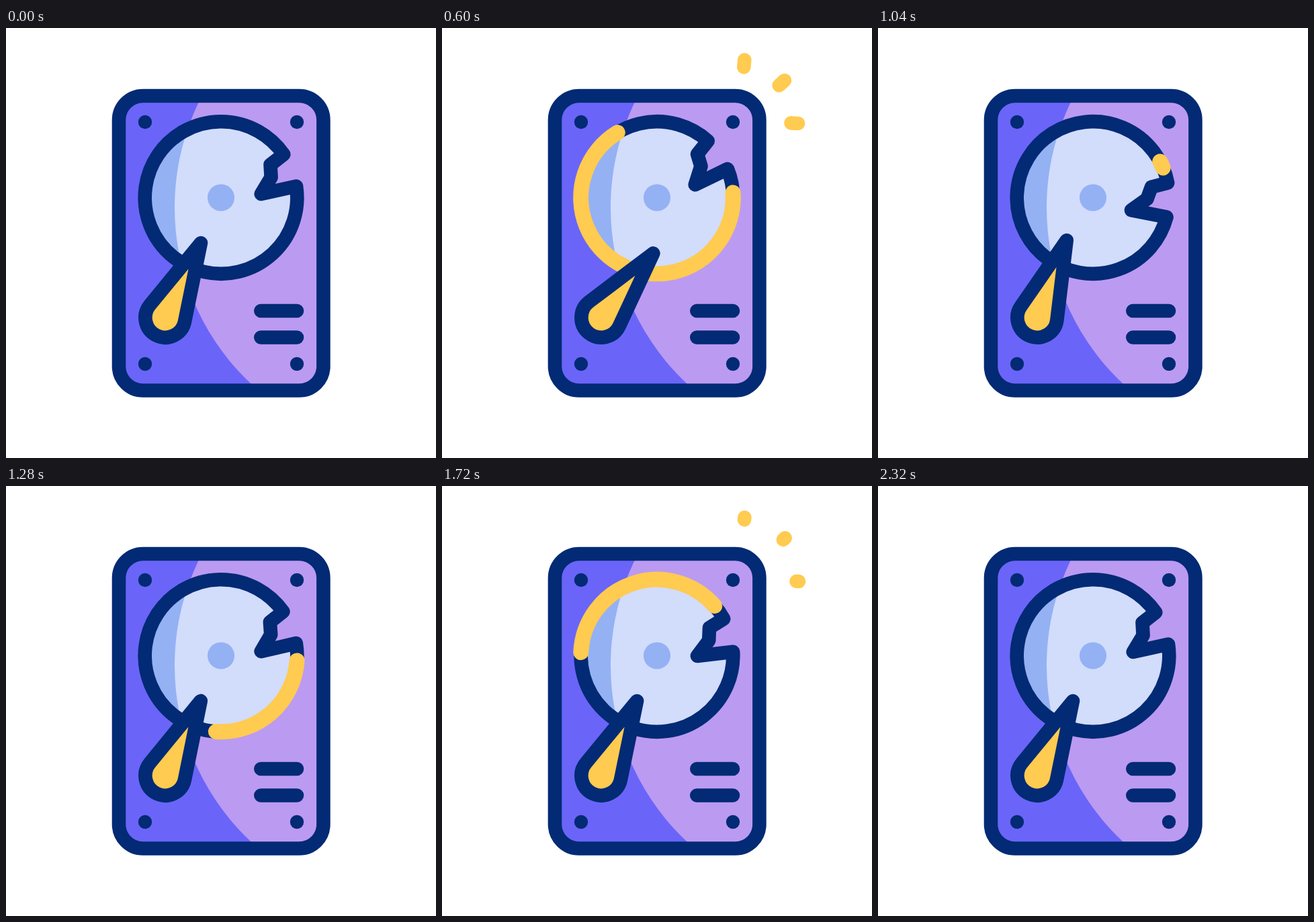
These frames come from a looping animation (640 px wide and 640 px high, 2.44 s). An HTML page:

```html
<!DOCTYPE html>
<html lang="en">
<head>
<meta charset="utf-8">
<title>Hard drive</title>
<style>
  html, body { margin: 0; width: 100%; height: 100%; overflow: hidden; background: #fff; }
  svg { display: block; width: 100vw; height: 100vh; }
  .line { fill: none; stroke: #032a74; stroke-width: 20.6; stroke-linecap: round; stroke-linejoin: round; }
  .glow { fill: none; stroke: #ffcb50; stroke-width: 20.6; stroke-linecap: round; }
  .dot { fill: #032a74; }
</style>
</head>
<body>
<svg viewBox="0 0 640 640">
  <defs>
    <clipPath id="caseClip"><rect x="168" y="101" width="304.4" height="438.5" rx="36"/></clipPath>
    <clipPath id="discClip"><path id="discHole"/></clipPath>
  </defs>

  <g clip-path="url(#caseClip)">
    <rect x="160" y="90" width="320" height="460" fill="#6a65f8"/>
    <circle cx="611" cy="267" r="360" fill="#bb9af2"/>
  </g>
  <rect class="line" x="168" y="101" width="304.4" height="438.5" rx="36"/>
  <g class="dot">
    <circle cx="207" cy="140" r="10.2"/>
    <circle cx="433" cy="140" r="10.2"/>
    <circle cx="207" cy="500" r="10.2"/>
    <circle cx="433" cy="500" r="10.2"/>
  </g>
  <path class="line" d="M379.3 421H433M379.3 460.5H433"/>

  <g clip-path="url(#discClip)">
    <rect x="190" y="120" width="260" height="260" fill="#94b1f4"/>
    <circle cx="611" cy="267" r="360" fill="#d2dcfb"/>
  </g>
  <circle cx="320" cy="252.5" r="20" fill="#94b1f4"/>
  <g id="disc">
    <path id="discLine" class="line"/>
    <path id="trail" class="glow" stroke-width="23" style="stroke-width:23"/>
  </g>

  <path id="arm" class="line" style="fill:#ffcb50"/>
  <g id="sparks"></g>
</svg>
<script>
const LOOP = 2440, STEP = 40, PASS = 880;
const CX = 320, CY = 252.5, R = 113.3;
const PIVOT = [237, 431];
const TRAIL = [4.5, 313.5];

// [time, degrees], eased between neighbours
const DISC_TURN = [[200, 0], [520, -16], [1040, 23.4], [1400, -9.2], [1920, 13], [2320, 0]];
const ARM_TURN = [[200, 0], [520, 14.7], [1040, -4.7], [1400, 1.5], [1760, 0]];

// inner x, y, outer x, y
const SPARKS = [
  [449.2, 58.6, 450.4, 46.7],
  [501.5, 85.6, 510.6, 77.4],
  [519.2, 141.4, 531, 142]
];

const el = id => document.getElementById(id);
const mix = (a, b, p) => a + (b - a) * p;

function ease(t, from, to) {
  const x = Math.min(1, Math.max(0, (t - from) / (to - from)));
  return x * x * (3 - 2 * x);
}

function track(keys, t) {
  let value = keys[0][1];
  for (let i = 1; i < keys.length; i++) {
    value += (keys[i][1] - keys[i - 1][1]) * ease(t, keys[i - 1][0], keys[i][0]);
  }
  return value;
}

function polar(deg) {
  const a = deg * Math.PI / 180;
  return (CX + R * Math.cos(a)).toFixed(2) + ' ' + (CY + R * Math.sin(a)).toFixed(2);
}

function arc(from, to) {
  return `M${polar(from)}A${R} ${R} 0 ${to - from > 180 ? 1 : 0} 1 ${polar(to)}`;
}

function armShape() {
  const [x, y] = PIVOT, r = 29.6, reach = 123;
  const a = Math.acos(r / reach);
  const dx = (r * Math.sin(a)).toFixed(2), ty = (y - r * Math.cos(a)).toFixed(2);
  return `M${x} ${y - reach}L${x + +dx} ${ty}A${r} ${r} 0 1 1 ${x - dx} ${ty}Z`;
}

const discShape = arc(-8.6, 325.4) + 'L393.5 203.5L394.6 222.3L379.7 247Z';
el('discLine').setAttribute('d', discShape);
el('discHole').setAttribute('d', discShape);
el('arm').setAttribute('d', armShape());

const sparks = SPARKS.map(() => {
  const path = document.createElementNS('http://www.w3.org/2000/svg', 'path');
  path.setAttribute('class', 'glow');
  el('sparks').append(path);
  return path;
});

function draw(t) {
  const spin = `rotate(${track(DISC_TURN, t)} ${CX} ${CY})`;
  el('disc').setAttribute('transform', spin);
  el('discHole').setAttribute('transform', spin);
  el('arm').setAttribute('transform', `rotate(${25.5 + track(ARM_TURN, t)} ${PIVOT})`);

  const u = t < 200 + PASS ? t : t - PASS;
  const tail = ease(u, 560, 1080), head = ease(u, 200, 760);
  el('trail').setAttribute('d', head > tail ? arc(mix(...TRAIL, tail), mix(...TRAIL, head)) : '');

  const near = ease(u, 560, 1000), far = ease(u, 400, 640);
  SPARKS.forEach(([x1, y1, x2, y2], i) => {
    const at = p => mix(x1, x2, p) + ' ' + mix(y1, y2, p);
    sparks[i].setAttribute('d', far > near ? `M${at(near)}L${at(far)}` : '');
  });
}

const begin = performance.now();
function tick() {
  const t = (performance.now() - begin) % LOOP;
  draw(Math.floor(t / STEP) * STEP);
  requestAnimationFrame(tick);
}
tick();
</script>
</body>
</html>
```
